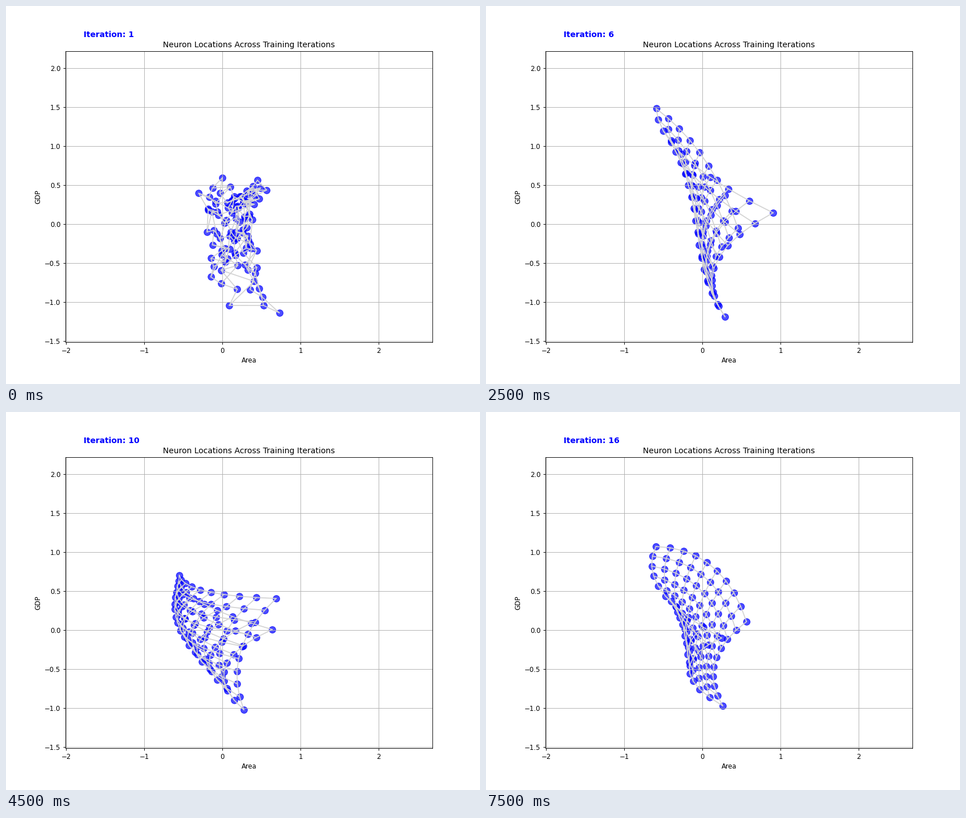
A matplotlib script for the animation above (8 s loop, 837x669 px).

```python
import numpy as np
import matplotlib.pyplot as plt
from matplotlib.animation import FuncAnimation

STEPS, SIDE, HEIGHT = 16, 10, 669

# Key points in pixels: four corners (start, side, spike, tail), crest, waist
POSES = {
    1: [(450, 310), (385, 312), (481, 544), (390, 430), (424, 335), (418, 375)],
    5: [(275, 103), (420, 444), (430, 365), (381, 527), (330, 290), (348, 365)],
    7: [(326, 260), (470, 343), (500, 367), (463, 537), (441, 252), (385, 352)],
    10: [(306, 289), (477, 330), (470, 385), (420, 527), (352, 317), (308, 385)],
    12: [(321, 254), (414, 355), (470, 393), (342, 513), (396, 305), (352, 370)],
    14: [(320, 117), (380, 359), (496, 367), (394, 511), (399, 207), (388, 325)],
    16: [(300, 238), (460, 371), (416, 400), (418, 520), (399, 273), (362, 365)],
}
KEYS = sorted(POSES)

# How far the other three edges bow away from a straight line
LEFT_BOW, BASE_BOW, RIGHT_BOW = np.array([(-48, -2), (-58, -4), (-35, -3)])
SWING = np.zeros((6, 2))
SWING[2, 0], SWING[3, 1] = 42, 18

# Quadratic basis through the start, middle and end of each edge
t = np.linspace(0, 1, SIDE)
BASIS = np.stack([(1 - t) * (1 - 2 * t), 4 * t * (1 - t), t * (2 * t - 1)], 1)
JITTER = np.random.default_rng(4).normal(0, 9, (SIDE, SIDE, 2))


def key_points(it):
    """Blend the neighbouring poses; spike and tail swing out in between."""
    a = max(k for k in KEYS if k <= it)
    b = min(k for k in KEYS if k >= it)
    mix = (it - a) / max(b - a, 1)
    pts = (1 - mix) * np.array(POSES[a]) + mix * np.array(POSES[b])
    return pts + SWING * 4 * mix * (1 - mix)


def neurons(it):
    """Pixel positions of the map at one iteration, shape (10, 10, 2)."""
    start, side, spike, tail, crest, waist = key_points(it)
    net = np.array([
        [start, crest, side],
        [(start + spike) / 2 + LEFT_BOW, waist, (side + tail) / 2 + RIGHT_BOW],
        [spike, (spike + tail) / 2 + BASE_BOW, tail],
    ])
    grid = np.einsum("ia,jb,abk->ijk", BASIS, BASIS, net)
    return grid + JITTER * max(0, 1 - (it - 1) / 4)


fig, ax = plt.subplots(figsize=(10.0001, 7.9931), dpi=83.7)
ax.set_xlim(-2.01, 2.69)
ax.set_ylim(-1.52, 2.212)
ax.set_xticks(range(-2, 3))
ax.set_title("Neuron Locations Across Training Iterations")
ax.set_xlabel("Area")
ax.set_ylabel("GDP")
ax.grid(True)

blank = np.zeros((SIDE, SIDE))
dots = ax.scatter(blank, blank, s=100, c="blue", alpha=0.7)
rows = ax.plot(blank, blank, color="lightgray")
cols = ax.plot(blank, blank, color="lightgray")
label = ax.text(0.05, 1.05, "", transform=ax.transAxes, fontsize=12,
                fontweight="bold", color="blue")
to_data = ax.transData.inverted()


def update(i):
    px = neurons(i + 1).reshape(-1, 2)
    pts = to_data.transform(np.column_stack([px[:, 0], HEIGHT - px[:, 1]]))
    dots.set_offsets(pts)
    grid = pts.reshape(SIDE, SIDE, 2)
    for k in range(SIDE):
        rows[k].set_data(*grid[k].T)
        cols[k].set_data(*grid[:, k].T)
    label.set_text(f"Iteration: {i + 1}")
    return [dots, label, *rows, *cols]


anim = FuncAnimation(fig, update, frames=STEPS, interval=500, repeat=True, repeat_delay=0)
plt.show()
```
